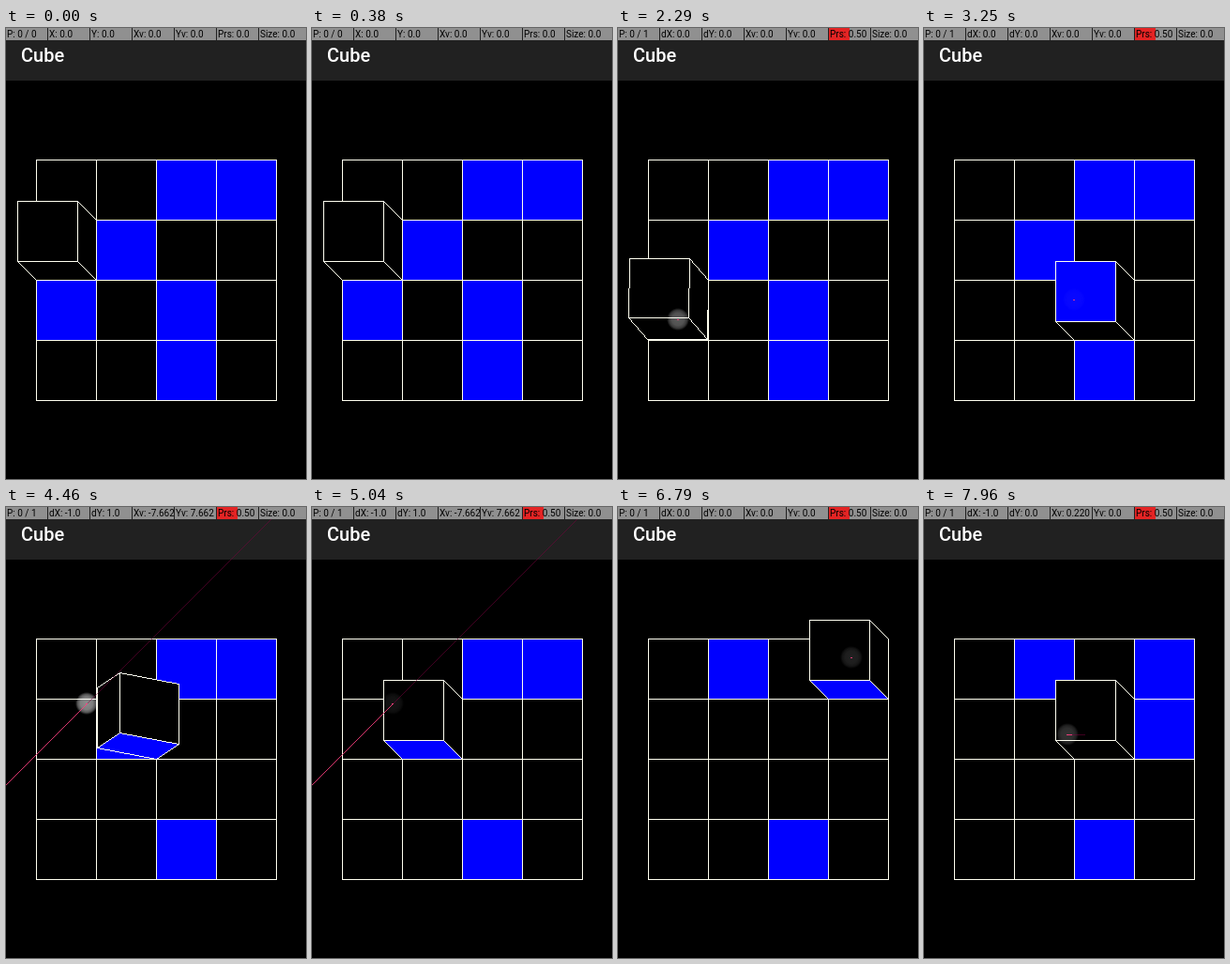
Recreate the animation shown at these times as an HTML page with a canvas. Size 320 by 480 pixels, loop 8000 ms.

```html
<!DOCTYPE html>
<html lang="en">
<head>
<meta charset="utf-8">
<title>Cube</title>
<style>
html, body { margin: 0; width: 320px; height: 480px; overflow: hidden; background: #000; }
header {
  position: absolute; left: 0; top: 0; width: 320px; height: 56px; background: #212121;
  color: #fff; font: 500 20px/24px Roboto, sans-serif;
}
h1 { position: absolute; left: 16px; top: 17px; margin: 0; font: inherit; }
canvas { position: absolute; left: 0; top: 0; }
#bar span {
  position: absolute; top: 0; height: 13px; padding-left: 1px; box-sizing: border-box;
  overflow: hidden; white-space: pre; background: #909090; color: #000;
  font: 10px/13px Roboto, sans-serif;
}
#bar span.pressed { background: linear-gradient(90deg, #e32424 22px, #909090 22px); }
</style>
</head>
<body>
<header><h1>Cube</h1></header>
<canvas id="stage" width="320" height="480"></canvas>
<div id="bar"></div>
<script>
const LOOP = 8000, ROLL = 130, PRESS = 37;
const LEFT = 32, TOP = 140, CELL = 64, HALF = CELL / 2, SHEAR = 20 / 64;
const LINE = '#fffff0', BLUE = '#00f';
const VELOCITY = 'rgba(255,64,128,.85)', ESTIMATE = 'rgba(128,0,64,.5)';

const NORMALS = {
  T: [0, 0, 1], B: [0, 0, -1], N: [0, -1, 0], S: [0, 1, 0], E: [1, 0, 0], W: [-1, 0, 0]
};
const OPPOSITE = { N: 'S', S: 'N', E: 'W', W: 'E' };

// Each tap: roll start, direction, touch point, leftover glow, drag, velocity, trail length.
const TAPS = [
  { at: 2165, dir: 'S', x: 64, y: 310, glow: .03 },
  { at: 2490, dir: 'E', x: 159, y: 290, glow: .03 },
  { at: 2655, dir: 'E', x: 160, y: 289, glow: .03 },
  { at: 3630, dir: 'N', x: 190, y: 215, glow: .1 },
  { at: 4386, dir: 'W', x: 86, y: 209, glow: .08, drag: [-1, 1], vel: [-7.662, 7.662], past: 204 },
  { at: 5110, dir: 'N', x: 130, y: 165, glow: .1 },
  { at: 5667, dir: 'E', x: 206, y: 160, glow: .1, drag: [1, 0], vel: [7.27, 0], past: 206 },
  { at: 6500, dir: 'E', x: 249, y: 160, glow: .13 },
  { at: 7250, dir: 'S', x: 255, y: 235, glow: .1 },
  { at: 7790, dir: 'W', x: 153, y: 242, glow: .2, drag: [-1, 0], vel: [.22, 0], past: -18 }
];

const ctx = document.getElementById('stage').getContext('2d');
const bar = document.getElementById('bar');
const fields = Array.from({ length: 7 }, (_, i) => {
  const span = document.createElement('span');
  span.style.left = i * 45 + 'px';
  span.style.width = (i < 6 ? 44 : 50) + 'px';
  return bar.appendChild(span);
});

// Roll the cube one cell, then swap paint between its base and the cell.
function step(state, dir) {
  const back = OPPOSITE[dir], [mx, my] = NORMALS[dir], old = state.faces;
  const faces = { ...old, [dir]: old.T, B: old[dir], [back]: old.B, T: old[back] };
  const next = { col: state.col + mx, row: state.row + my, faces, cells: [...state.cells] };
  const i = next.row * 4 + next.col;
  [faces.B, next.cells[i]] = [next.cells[i], faces.B];
  return next;
}

const states = [{
  col: 0, row: 1, faces: {},
  cells: Array.from('0011010010100010', c => c === '1')
}];
TAPS.forEach((tap, i) => states.push(step(states[i], tap.dir)));

function turn([x, y, z], [mx, my], a) {
  const u = x * mx + y * my, du = u * Math.cos(a) + z * Math.sin(a) - u;
  return [x + mx * du, y + my * du, z * Math.cos(a) - u * Math.sin(a)];
}

// Hard-edged line, one pixel wide.
function line(x1, y1, x2, y2, color) {
  const n = Math.ceil(Math.max(Math.abs(x2 - x1), Math.abs(y2 - y1), 1));
  ctx.fillStyle = color;
  for (let i = 0; i <= n; i++) {
    ctx.fillRect(Math.round(x1 + (x2 - x1) * i / n), Math.round(y1 + (y2 - y1) * i / n), 1, 1);
  }
}

function drawGrid(cells) {
  cells.forEach((on, i) => {
    if (!on) return;
    ctx.fillStyle = BLUE;
    ctx.fillRect(LEFT + i % 4 * CELL, TOP + (i >> 2) * CELL, CELL, CELL);
  });
  const size = CELL * 4;
  for (let i = 0; i <= size; i += CELL) {
    line(LEFT + i, TOP, LEFT + i, TOP + size, LINE);
    line(LEFT, TOP + i, LEFT + size, TOP + i, LINE);
  }
}

function drawCube(state, dir, angle) {
  const m = NORMALS[dir];
  const cx = LEFT + (state.col + .5) * CELL, cy = TOP + (state.row + .5) * CELL;
  const project = p => {
    const [x, y, z] = turn([p[0] - m[0] * HALF, p[1] - m[1] * HALF, p[2] + HALF], m, angle);
    return [cx + x + m[0] * HALF - SHEAR * z, cy + y + m[1] * HALF - SHEAR * z].map(Math.round);
  };
  for (const [name, n] of Object.entries(NORMALS)) {
    const [nx, ny, nz] = turn(n, m, angle);
    if (SHEAR * (nx + ny) + nz <= 1e-6) continue;
    const s = [n[2], n[0], n[1]], t = [n[1], n[2], n[0]];
    const corners = [[1, 1], [1, -1], [-1, -1], [-1, 1]].map(
      ([a, b]) => project(n.map((v, i) => HALF * (v + a * s[i] + b * t[i]))));
    ctx.beginPath();
    corners.forEach(([x, y]) => ctx.lineTo(x + .5, y + .5));
    ctx.fillStyle = state.faces[name] ? BLUE : '#000';
    ctx.fill();
    corners.forEach((p, i) => line(...p, ...corners[(i + 1) % 4], LINE));
  }
}

function drawTouch(tap, age) {
  const { x, y, vel = [0, 0], past = 0 } = tap;
  const fade = Math.min(1, Math.max(0, (age - 100) / 70));
  const alpha = .55 + (tap.glow - .55) * fade;
  const glow = ctx.createRadialGradient(x, y, 0, x, y, 12);
  glow.addColorStop(0, `rgba(255,255,255,${alpha})`);
  glow.addColorStop(.55, `rgba(255,255,255,${alpha * .9})`);
  glow.addColorStop(.8, `rgba(255,255,255,${alpha * .6})`);
  glow.addColorStop(1, 'rgba(255,255,255,0)');
  ctx.fillStyle = glow;
  ctx.fillRect(x - 12, y - 12, 24, 24);

  if (age >= 0 && past) {
    const [sx, sy] = vel.map(Math.sign);
    line(x - sx * past, y - sy * past, x, y, ESTIMATE);
    line(x, y, x + vel[0] * 16, y + vel[1] * 16, VELOCITY);
  }
  line(x - 1, y, x, y, VELOCITY);
}

function showBar(tap, age) {
  const down = tap && age < 0;
  const [dx, dy] = tap && tap.drag || [0, 0];
  const vel = tap && age >= 0 && tap.vel || [0, 0];
  const speed = v => v ? v.toFixed(3) : '0.0';
  const place = (axis, pos, delta) =>
    tap && !down ? `d${axis}: ${delta.toFixed(1)}` : `${axis}: ${pos.toFixed(1)}`;
  const texts = [
    `P: ${down ? 1 : 0} / ${tap ? 1 : 0}`,
    place('X', tap ? tap.x : 0, dx),
    place('Y', tap ? tap.y : 0, dy),
    `Xv: ${speed(vel[0])}`,
    `Yv: ${speed(vel[1])}`,
    `Prs: ${tap ? '0.50' : '0.0'}`,
    'Size: 0.0'
  ];
  texts.forEach((text, i) => {
    if (fields[i].textContent !== text) fields[i].textContent = text;
  });
  fields[5].className = tap ? 'pressed' : '';
}

function draw(t) {
  const tapIndex = TAPS.filter(tap => tap.at - PRESS <= t).length - 1;
  const tap = TAPS[tapIndex], age = tap ? t - tap.at : 0;
  const done = age >= ROLL;
  const state = states[tap ? tapIndex + (done ? 1 : 0) : 0];
  const angle = tap && !done ? Math.max(0, age / ROLL) * Math.PI / 2 : 0;

  ctx.clearRect(0, 0, 320, 480);
  drawGrid(state.cells);
  drawCube(state, tap ? tap.dir : 'E', angle);
  if (tap) drawTouch(tap, age);
  showBar(tap, age);
}

const start = performance.now();
function tick() {
  draw((performance.now() - start) % LOOP);
  requestAnimationFrame(tick);
}
tick();
</script>
</body>
</html>
```
